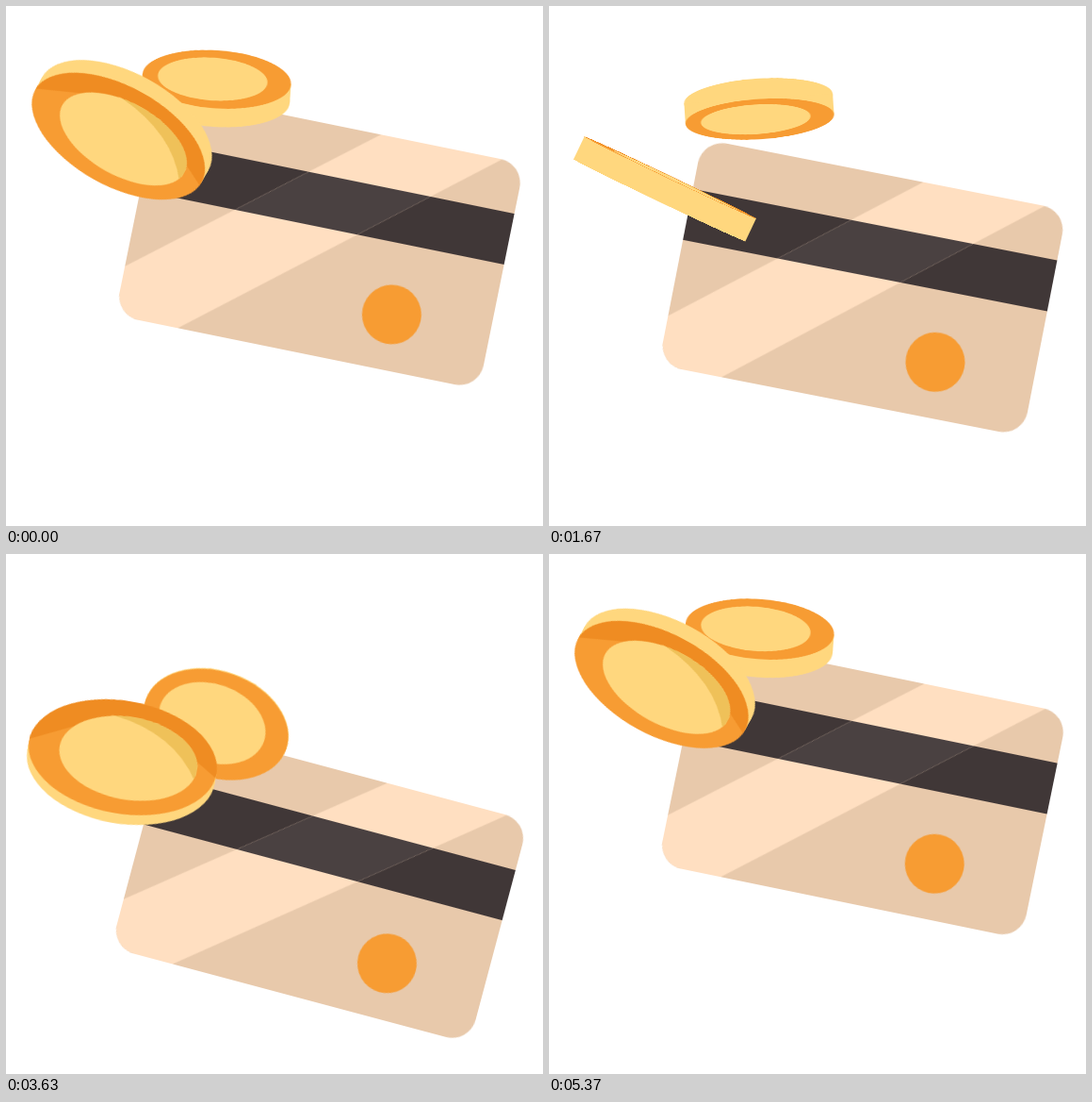
Recreate the animation shown at these times as an HTML page without scripts. Size 570 px wide and 551 px high, loop 5.41 s.

```html
<!DOCTYPE html>
<html lang="en">
<head>
<meta charset="utf-8">
<title>Card and coins</title>
<style>
  html, body { margin: 0; width: 100%; height: 100%; overflow: hidden; background: #fff; }
  .stage { position: relative; width: 570px; height: 551px; overflow: hidden; }

  /* A zero-size anchor that bobs between --y0 and --y1 and rocks between --r0 and --r1 */
  .float {
    position: absolute; left: var(--x); top: 0; width: 0; height: 0;
    animation: bob 2705ms infinite alternate, rock 2705ms infinite alternate;
    animation-timing-function: cubic-bezier(.364, 0, .636, 1);
    animation-delay: calc(var(--bob) - 5410ms), calc(var(--rock) - 5410ms);
  }
  @keyframes bob { from { translate: 0 var(--y0); } to { translate: 0 var(--y1); } }
  @keyframes rock { from { rotate: var(--r0); } to { rotate: var(--r1); } }

  .card { --x: 332.8px; --y0: 242px; --y1: 362px; --bob: 370ms; --r0: 10.25deg; --r1: 14.95deg; --rock: 930ms; }
  .card svg { position: absolute; left: -197px; top: -122px; }

  .back { --x: 222.7px; --y0: 73.5px; --y1: 183.5px; --bob: 630ms; --r0: -6deg; --r1: 20deg; --rock: 1150ms;
    --a: 79px; --b: 56px; --t: 23.5px; --from: -90deg; --to: 90deg; --flip: 1000ms; }
  .front { --x: 122.7px; --y0: 130px; --y1: 240px; --bob: 180ms; --r0: 32.3deg; --r1: 9.7deg; --rock: 670ms;
    --a: 101px; --b: 65px; --t: 26.5px; --from: 90deg; --to: -90deg; --flip: 1625ms; }

  /* A coin is a rear disc, a wall joining both rims, and a face, all turning together */
  .part {
    position: absolute; left: calc(-1 * var(--a)); top: calc(-1 * var(--h));
    width: calc(2 * var(--a)); height: calc(2 * var(--h));
    animation: flip 5410ms linear infinite;
    animation-delay: calc(var(--flip) - 5410ms);
  }
  @keyframes flip {
    from { transform: rotateX(var(--from)) translateZ(var(--z)) rotateX(var(--q)); }
    to { transform: rotateX(var(--to)) translateZ(var(--z)) rotateX(var(--q)); }
  }
  .rear, .wall { background: #ffd77e; }
  .rear { --h: var(--b); --z: calc(var(--t) / -2); --q: 0deg; border-radius: 50%; }
  .wall { --h: calc(var(--t) / 2); --z: 0px; --q: 90deg; }
  .face { --h: var(--b); --z: calc(var(--t) / 2); --q: 0deg; }

  .gold { fill: #ffd77e; }
  .orange { fill: #f79c33; }
</style>
</head>
<body>
<div class="stage">
  <div class="float card">
    <svg width="394" height="244" viewBox="-197 -122 394 244">
      <clipPath id="shape"><rect x="-197" y="-122" width="394" height="244" rx="26"/></clipPath>
      <clipPath id="glare"><path d="M41.6-122H173L-129 122H-197V69Z"/></clipPath>
      <g clip-path="url(#shape)">
        <path fill="#e8c9ab" d="M-197-122H197V122H-197Z"/>
        <path fill="#403737" d="M-197-68H197V-13H-197Z"/>
        <g clip-path="url(#glare)">
          <path fill="#ffdfc1" d="M-197-122H197V122H-197Z"/>
          <path fill="#4a4141" d="M-197-68H197V-13H-197Z"/>
        </g>
      </g>
      <circle class="orange" cx="90.7" cy="62.7" r="31.5"/>
    </svg>
  </div>

  <div class="float back">
    <div class="part rear"></div>
    <div class="part wall"></div>
    <svg class="part face" viewBox="-79 -56 158 112">
      <ellipse class="orange" rx="79" ry="56"/>
      <ellipse class="gold" cx="-4.3" rx="58.3" ry="41.5"/>
    </svg>
  </div>

  <div class="float front">
    <div class="part rear"></div>
    <div class="part wall"></div>
    <svg class="part face" viewBox="-101 -65 202 130">
      <clipPath id="rim"><ellipse rx="101" ry="65"/></clipPath>
      <clipPath id="inner"><ellipse cx="6" rx="74" ry="47.7"/></clipPath>
      <ellipse class="orange" rx="101" ry="65"/>
      <path clip-path="url(#rim)" fill="#ef8c22" d="M-101-2L-18-46L80-9L102 5.5V-65H-101Z"/>
      <ellipse class="gold" cx="6" rx="74" ry="47.7"/>
      <path clip-path="url(#inner)" fill="#efc159" d="M-18-46Q50-38 80 13L101 0V-65H-18Z"/>
    </svg>
  </div>
</div>
</body>
</html>
```
